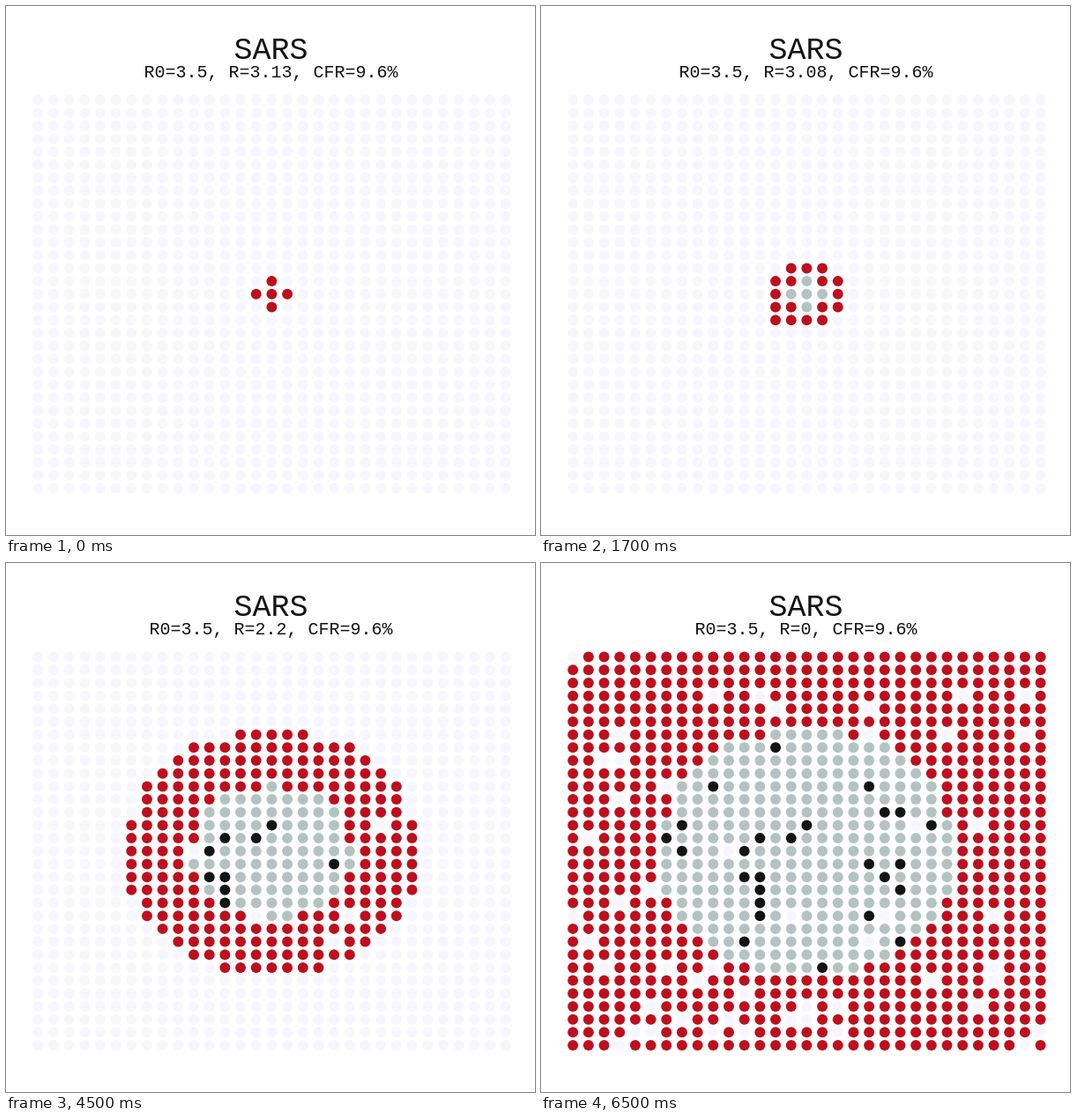
Animation of 600x600 px, one loop 8000 ms. Source, as an HTML page with a canvas:

```html
<!DOCTYPE html>
<html lang="en">
<head>
<meta charset="utf-8">
<title>SARS spread</title>
<style>
  html, body { margin: 0; width: 100%; height: 100%; overflow: hidden; background: #fff; }
  canvas { display: block; width: 600px; height: 600px; }
</style>
</head>
<body>
<canvas id="stage"></canvas>
<script>
const SIZE = 600, HALF = 15, LOOP = 8000;
const CENTER = { x: 301.4, y: 326.8 }, GAP = { x: 17.68, y: 14.68 };
const RINGS = [1.5, 7.8, 26, 90];
const RATES = ['3.13', '3.08', '2.87', '2.2', '0'];
const COLORS = { healthy: '#f7f6fe', ill: '#be0f1e', recovered: '#b3c3c1', dead: '#141414' };
const FONT = '"Courier New", Courier, "Liberation Mono", monospace';

// Key cells as "x,y" steps from the centre.
const firstDeaths = '0,-2 -1,-1 -3,-1 -4,0 4,1 -4,2 -3,2 -3,3 -3,4'.split(' ');
const innerGaps = '7,-2 -5,0 -1,5 5,5 4,7'.split(' ');

let seed = 7;
function random() {
  seed = (seed * 16807) % 2147483647;
  return seed / 2147483647;
}

// The disease spreads in rings that lean slightly down and left.
function ringOf(x, y) {
  const reach = x * x + y * y - y / 10 + x / 100;
  const ring = RINGS.findIndex(limit => reach < limit);
  return ring < 0 ? RINGS.length : ring;
}

function makeDot(x, y) {
  const key = x + ',' + y, ring = ringOf(x, y), luck = random();
  const spared = innerGaps.includes(key) || (ring === 4 && luck < 0.05);
  return {
    x: CENTER.x + x * GAP.x,
    y: CENTER.y + y * GAP.y,
    onset: spared ? Infinity : ring,
    dies: firstDeaths.includes(key) || (ring === 3 && luck < 0.07)
  };
}

const dots = [];
for (let y = -HALF; y <= HALF; y++) {
  for (let x = -HALF; x <= HALF; x++) dots.push(makeDot(x, y));
}

const canvas = document.getElementById('stage');
const ctx = canvas.getContext('2d');
const ratio = window.devicePixelRatio || 1;
canvas.width = canvas.height = SIZE * ratio;
ctx.scale(ratio, ratio);
ctx.textAlign = 'center';

function state(dot, step) {
  if (step < dot.onset) return 'healthy';
  if (step === dot.onset) return 'ill';
  return dot.dies ? 'dead' : 'recovered';
}

function label(text, size, y) {
  ctx.font = `${size}px ${FONT}`;
  ctx.fillText(text, 300.6, y);
}

function draw(step) {
  ctx.fillStyle = '#fff';
  ctx.fillRect(0, 0, SIZE, SIZE);

  ctx.fillStyle = COLORS.dead;
  label('SARS', 35, 60);
  label(`R0=3.5, R=${RATES[step]}, CFR=9.6%`, 20, 80.5);

  for (const dot of dots) {
    ctx.fillStyle = COLORS[state(dot, step)];
    ctx.beginPath();
    ctx.arc(dot.x, dot.y, 6, 0, Math.PI * 2);
    ctx.fill();
  }
}

// One step every two seconds, with the first cut short.
let shown = -1;
function tick() {
  const t = performance.now() % LOOP;
  const step = Math.floor((t + 1500) / 2000);
  if (step !== shown) draw(shown = step);
  requestAnimationFrame(tick);
}
tick();
</script>
</body>
</html>
```
